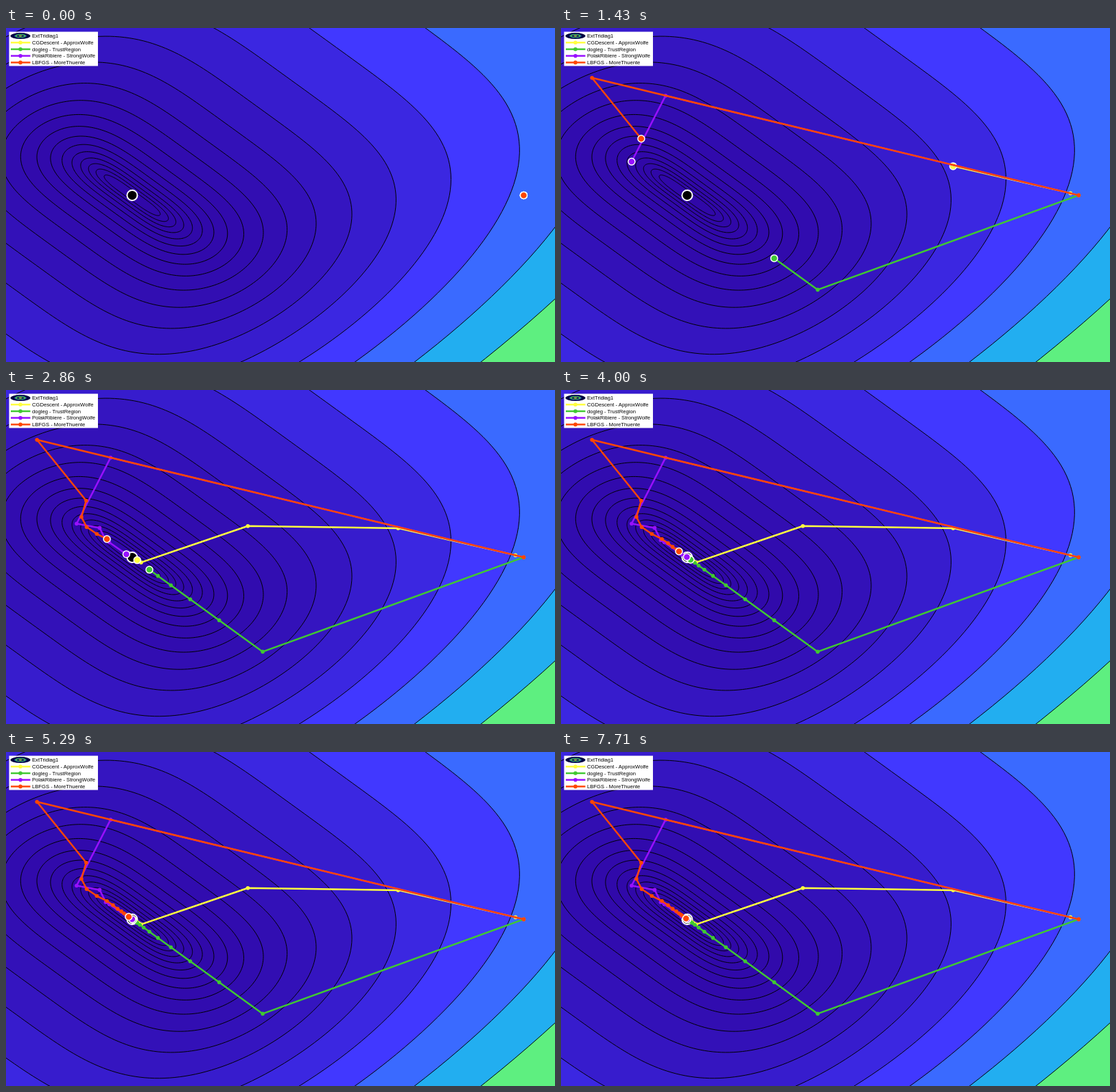
An HTML page for the animation above (8000 ms loop, 800 by 488 pixels).

```html
<!DOCTYPE html>
<html>
<head>
<meta charset="utf-8">
<style>
html, body { margin: 0; width: 100%; height: 100%; overflow: hidden; background: #5eef80; }
svg { display: block; width: 800px; height: 488px; }
text { font: 7.65px "Liberation Sans", Arial, sans-serif; }
</style>
</head>
<body>
<svg id="stage" viewBox="0 0 800 488"></svg>
<script>
const LOOP = 8000, DELAY = 450, STEP = 350, STEPS = 17;
const MIN = [183.5, 244], SCALE = [570.5, 414];
const stage = document.getElementById('stage');

const toPixel = ([u, v]) => [MIN[0] + SCALE[0] * u, MIN[1] - SCALE[1] * v];
const dot = ([x, y], r, fill, ring = 0) =>
  `<circle cx="${x}" cy="${y}" r="${r}" fill="${fill}" stroke="#fff" stroke-width="${ring}"/>`;
const line = (points, color) =>
  `<polyline points="${points.join(' ')}" fill="none" stroke="${color}" stroke-width="2.5" stroke-linejoin="round"/>`;

// Level curve of (u + v)^2 + (u - v)^4 = level, with the minimum at u = v = 0
function contour(level, fill) {
  const points = [];
  for (let i = 0; i < 240; i++) {
    const a = i * Math.PI / 120, sin = Math.sin(a);
    const sum = Math.sqrt(level) * Math.cos(a) * Math.sqrt(1 + sin * sin);
    const diff = level ** 0.25 * sin;
    points.push(toPixel([(sum + diff) / 2, (sum - diff) / 2]));
  }
  return `<polygon points="${points.join(' ')}" fill="${fill}" stroke="#000"/>`;
}

function bandColor(k) {
  if (k < 2) return ['#22aef0', '#3a6aff'][k];
  const q = 0.65 ** (k - 2);
  return `rgb(${48 + 17 * q}, ${8 + 48 * q}, ${168 + 87 * q})`;
}

// Levels are evenly spaced on a shifted log scale
const level = k => Math.exp(1.585 - k / 2);
let field = '';
for (let k = 0; k < 18; k++) field += contour(level(k) - level(18), bandColor(k));

const dotProduct = (a, b) => a[0] * b[0] + a[1] * b[1];
const addScaled = (a, b, t) => [a[0] + b[0] * t, a[1] + b[1] * t];
const gradient = ([u, v]) => {
  const sum = 2 * (u + v), diff = 4 * (u - v) ** 3;
  return [sum + diff, sum - diff];
};

// Quasi-Newton descent: a short first step, then full steps
function lbfgs(firstStep) {
  const path = [[1, 0]], pairs = [];
  for (let n = 0; n < STEPS; n++) {
    const x = path[n], g = gradient(x);
    let q = g;
    for (const p of [...pairs].reverse()) {
      p.alpha = dotProduct(p.s, q) / dotProduct(p.s, p.y);
      q = addScaled(q, p.y, -p.alpha);
    }
    const last = pairs[pairs.length - 1];
    const scale = last ? dotProduct(last.s, last.y) / dotProduct(last.y, last.y) : firstStep;
    let r = [q[0] * scale, q[1] * scale];
    for (const p of pairs) {
      const beta = dotProduct(p.y, r) / dotProduct(p.s, p.y);
      r = addScaled(r, p.s, p.alpha - beta);
    }
    const next = addScaled(x, r, -1);
    pairs.push({ s: [-r[0], -r[1]], y: addScaled(gradient(next), g, -1) });
    path.push(next);
  }
  return path.map(toPixel);
}

// Newton steps shrink by 2/3 along the valley
function newton() {
  const path = [[1, 0]];
  for (let u = 1 / 3; path.length <= STEPS; u *= 2 / 3) path.push([u, -u]);
  return path.map(toPixel);
}

// Key points, then a geometric approach to the minimum
function settle(points, ratio) {
  const path = [toPixel([1, 0]), ...points];
  while (path.length <= STEPS) {
    const end = path[path.length - 1];
    path.push(end.map((c, i) => MIN[i] + (c - MIN[i]) * ratio));
  }
  return path;
}

const solvers = [
  { name: 'CGDescent - ApproxWolfe', color: '#ffff40',
    path: settle([[742, 241], [571, 201.5], [352, 198.3], [196.5, 251.5]], 0.75) },
  { name: 'dogleg - TrustRegion', color: '#40c832', path: newton() },
  { name: 'PolakRibiere - StrongWolfe', color: '#9810ff',
    path: settle([[152, 98.5], [102.5, 194.8], [136, 201], [145, 219], [150, 222], [175, 239.5]], 0.5) },
  { name: 'LBFGS - MoreThuente', color: '#ff4600', path: lbfgs(0.2072) }
];

const label = (row, name) => `<text x="38" y="${14.2 + row * 9.75}">${name}</text>`;
const oval = (rx, ry, fill) => `<ellipse cx="21" cy="11.6" rx="${rx}" ry="${ry}" fill="${fill}"/>`;

function legend() {
  let out = '<rect x="4.5" y="5.5" width="129.5" height="50" fill="#fff"/>' +
    oval(14.5, 4.5, '#000040') + oval(9, 3, '#1450a0') + oval(7.5, 2.5, '#50d040') +
    oval(5.5, 1.7, '#101060') + oval(2.5, 0.8, '#c0e040') + label(0, 'ExtTridiag1');
  solvers.forEach(({ name, color }, i) => {
    const y = 21.3 + i * 9.7;
    out += line([[7, y], [35.5, y]], color) + dot([21, y], 2.8, color) + label(i + 1, name);
  });
  return out;
}

stage.innerHTML = `<g transform="translate(.4 .4)">${field}${dot(MIN, 7.5, '#000', 2)}<g id="trails"></g></g>` + legend();
const trails = document.getElementById('trails');

function trail({ path, color }, step) {
  const seen = path.slice(0, step + 1);
  return line(seen, color) + seen.map(p => dot(p, 2.8, color)).join('') +
    dot(seen[seen.length - 1], 5, color, 1.5);
}

let shown = -1;
function draw(now) {
  const step = Math.max(0, Math.floor((now % LOOP - DELAY) / STEP));
  if (step !== shown) {
    trails.innerHTML = solvers.map(s => trail(s, step)).join('');
    shown = step;
  }
  requestAnimationFrame(draw);
}
draw(performance.now());
</script>
</body>
</html>
```
